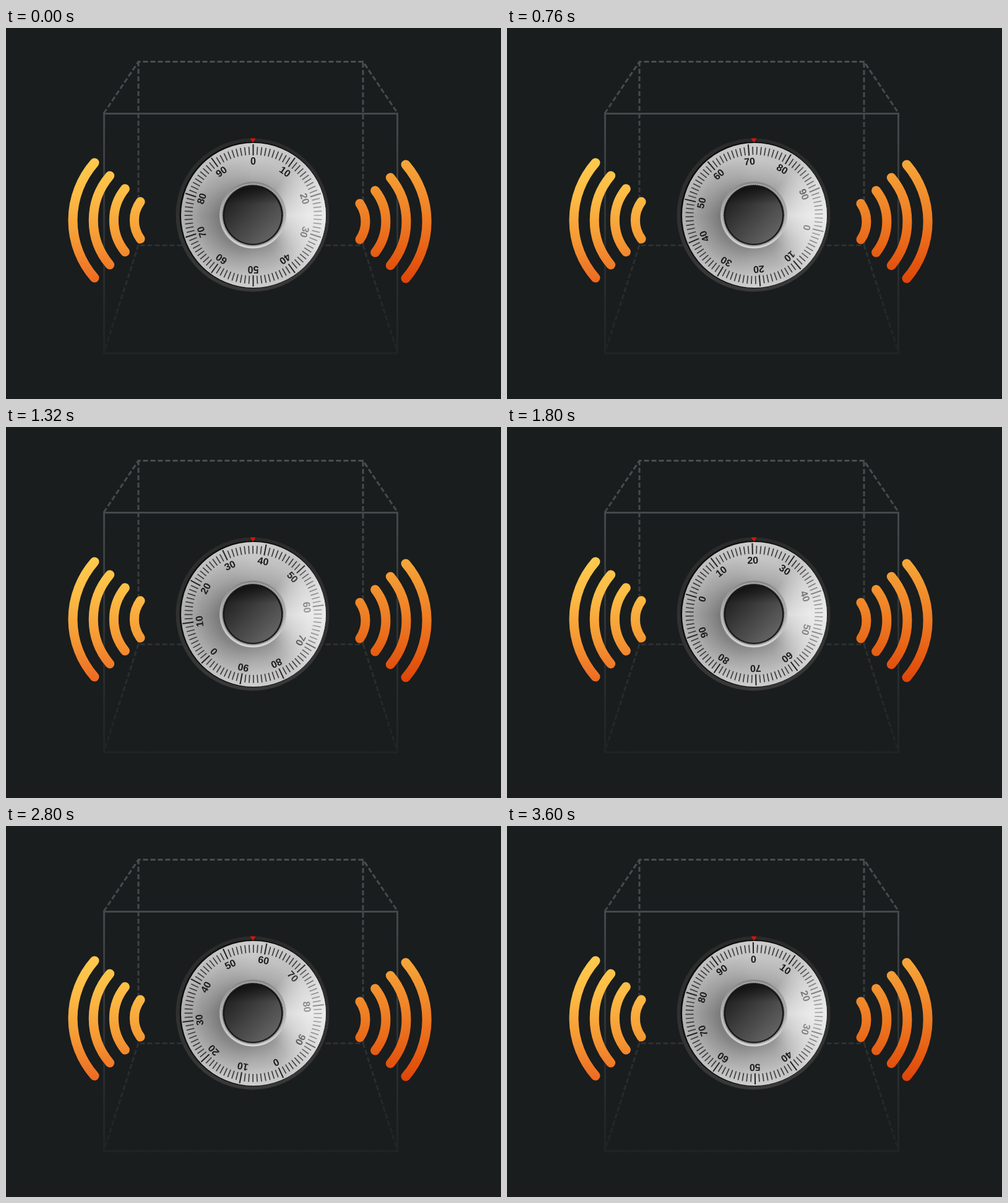
An HTML page with a canvas that plays this animation: 800x600 px, repeating every 3.84 s.

```html
<!DOCTYPE html>
<html lang="en">
<head>
<meta charset="utf-8">
<title>Safe dial</title>
<style>
  html, body { margin: 0; width: 100%; height: 100%; overflow: hidden; background: #191d1e; }
  canvas { display: block; }
</style>
</head>
<body>
<canvas id="stage" width="800" height="600"></canvas>
<script>
const ctx = document.getElementById('stage').getContext('2d');
const TAU = Math.PI * 2;
const CX = 399.5, CY = 303;
const LOOP = 3840, STEP = 40;

function withStops(gradient, ...stops) {
  for (const [at, color] of stops) gradient.addColorStop(at, color);
  return gradient;
}

const linear = (x0, y0, x1, y1, ...stops) =>
  withStops(ctx.createLinearGradient(x0, y0, x1, y1), ...stops);
const vertical = (y0, y1, ...stops) => linear(0, y0, 0, y1, ...stops);
const radial = (x, y, r0, r1, ...stops) =>
  withStops(ctx.createRadialGradient(x, y, r0, x, y, r1), ...stops);
const conic = (...stops) =>
  withStops(ctx.createConicGradient(0, CX, CY), ...stops);

const paint = {
  box: vertical(54, 526, [0, '#4a4e50'], [0.18, '#44484a'], [0.63, '#2c3031'], [1, '#202425']),
  leftWaves: vertical(212, 410, [0, '#ffca4e'], [0.3, '#fdbc45'], [0.65, '#f59a34'], [1, '#ee6a22']),
  rightWaves: vertical(214, 412, [0, '#f6a83a'], [0.5, '#ee7a22'], [1, '#df4507']),
  bezel: vertical(178, 428, [0, '#2b2a2a'], [0.5, '#303030'], [1, '#393939']),
  metal: conic([0, '#e4e4e4'], [0.1, '#cdcdcd'], [0.17, '#bebebe'], [0.25, '#c6c6c6'], [0.36, '#b8b8b8'],
    [0.5, '#a4a4a4'], [0.62, '#b6b6b6'], [0.75, '#c6c6c6'], [0.86, '#bdbdbd'], [1, '#e4e4e4']),
  hollow: radial(CX - 10, CY + 8, 46, 100, [0, 'rgba(70,70,70,.45)'], [0.5, 'rgba(90,90,90,.2)'], [1, 'rgba(110,110,110,0)']),
  rim: radial(CX, CY, 85, 118, [0, 'rgba(255,255,255,0)'], [1, 'rgba(255,255,255,.15)']),
  glare: conic([0, 'rgba(238,238,238,.6)'], [0.06, 'rgba(230,230,230,.5)'], [0.14, 'rgba(220,220,220,0)'],
    [0.86, 'rgba(220,220,220,0)'], [0.94, 'rgba(230,230,230,.45)'], [1, 'rgba(238,238,238,.6)']),
  collar: vertical(248, 357, [0, '#858585'], [0.5, '#b4b4b4'], [1, '#d8d8d8']),
  knob: linear(366, 269, 432, 336, [0, '#202020'], [0.5, '#424242'], [1, '#626262']),
  knobTop: vertical(255, 285, [0, 'rgba(0,0,0,.6)'], [1, 'rgba(0,0,0,0)'])
};

function disc(x, y, r, fill) {
  ctx.beginPath();
  ctx.arc(x, y, r, 0, TAU);
  ctx.fillStyle = fill;
  ctx.fill();
}

function line(...points) {
  ctx.beginPath();
  for (const [x, y] of points) ctx.lineTo(x, y);
  ctx.stroke();
}

function drawBox() {
  ctx.strokeStyle = paint.box;
  ctx.lineWidth = 3;
  ctx.setLineDash([8, 4]);
  line([158, 138], [214, 54.5], [577, 54.5], [633, 138]);
  line([214, 54], [214, 351.5], [577, 351.5], [577, 54]);
  line([214, 351], [158, 526]);
  line([577, 351], [633, 526]);
  ctx.setLineDash([]);
  ctx.strokeRect(158.5, 138.5, 474, 387.5);
}

// Four nested arcs; side is -1 for left and 1 for right.
function drawWaves(x, top, bottom, side, color) {
  ctx.strokeStyle = color;
  ctx.lineWidth = 15;
  ctx.lineCap = 'round';
  for (let i = 0; i < 4; i++) {
    const r = 141 - 30 * i;
    const half = (bottom - top) / 2 - 21 * i;
    const spread = Math.asin(half / r);
    const facing = side < 0 ? Math.PI : 0;
    const centre = x - side * (24.7 * i + r * Math.cos(spread));
    ctx.beginPath();
    ctx.arc(centre, (top + bottom) / 2, r, facing - spread, facing + spread);
    ctx.stroke();
  }
  ctx.lineCap = 'butt';
}

function drawScale(degrees) {
  ctx.save();
  ctx.translate(CX, CY);
  ctx.rotate(degrees * TAU / 360);
  ctx.font = 'bold 16px "Liberation Sans", Arial, sans-serif';
  ctx.textAlign = 'center';
  ctx.fillStyle = '#1c1c1c';
  for (let n = 0; n < 100; n++) {
    const major = n % 10 === 0;
    ctx.strokeStyle = major ? '#222' : '#3c3c3c';
    ctx.lineWidth = major ? 2 : 1.7;
    line([0, major ? -115 : -111], [0, major ? -97 : -98]);
    if (major) ctx.fillText(n, 0, -82);
    ctx.rotate(TAU / 100);
  }
  ctx.restore();
}

function drawKnob() {
  disc(399, 302.5, 54, paint.collar);
  disc(399, 302.5, 51, '#a8a8a8');
  disc(399, 302.5, 48.5, '#151515');
  ctx.strokeStyle = '#333';
  ctx.lineWidth = 1.5;
  ctx.setLineDash([1.6, 1.6]);
  ctx.beginPath();
  ctx.arc(399, 302.5, 48.5, 0, TAU);
  ctx.stroke();
  ctx.setLineDash([]);
  disc(399, 303, 46, paint.knob);
  disc(399, 303, 46, paint.knobTop);
}

function drawDial(degrees) {
  disc(398.5, 302.5, 124, paint.bezel);
  disc(399, 302.5, 118.5, '#0c0d0d');
  for (const fill of [paint.metal, paint.hollow, paint.rim]) disc(400, 303, 117, fill);
  drawScale(degrees);
  disc(400, 303, 117, paint.glare);
  drawKnob();
  ctx.fillStyle = '#d8140c';
  ctx.beginPath();
  ctx.moveTo(394.5, 178.5);
  ctx.lineTo(403.5, 178.5);
  ctx.lineTo(399, 185.5);
  ctx.fill();
}

function ease(time, start, end) {
  const x = Math.min(1, Math.max(0, (time - start) / (end - start)));
  return x * x * (3 - 2 * x);
}

function frame(now) {
  const time = Math.floor(now % LOOP / STEP) * STEP;
  ctx.fillStyle = '#191d1e';
  ctx.fillRect(0, 0, 800, 600);
  drawBox();
  drawWaves(143, 218, 404, -1, paint.leftWaves);
  drawWaves(646, 221, 405, 1, paint.rightWaves);
  drawDial(288 * ease(time, 0, 1880) - 288.8 * ease(time, 2080, 3600));
  requestAnimationFrame(frame);
}
requestAnimationFrame(frame);
</script>
</body>
</html>
```
